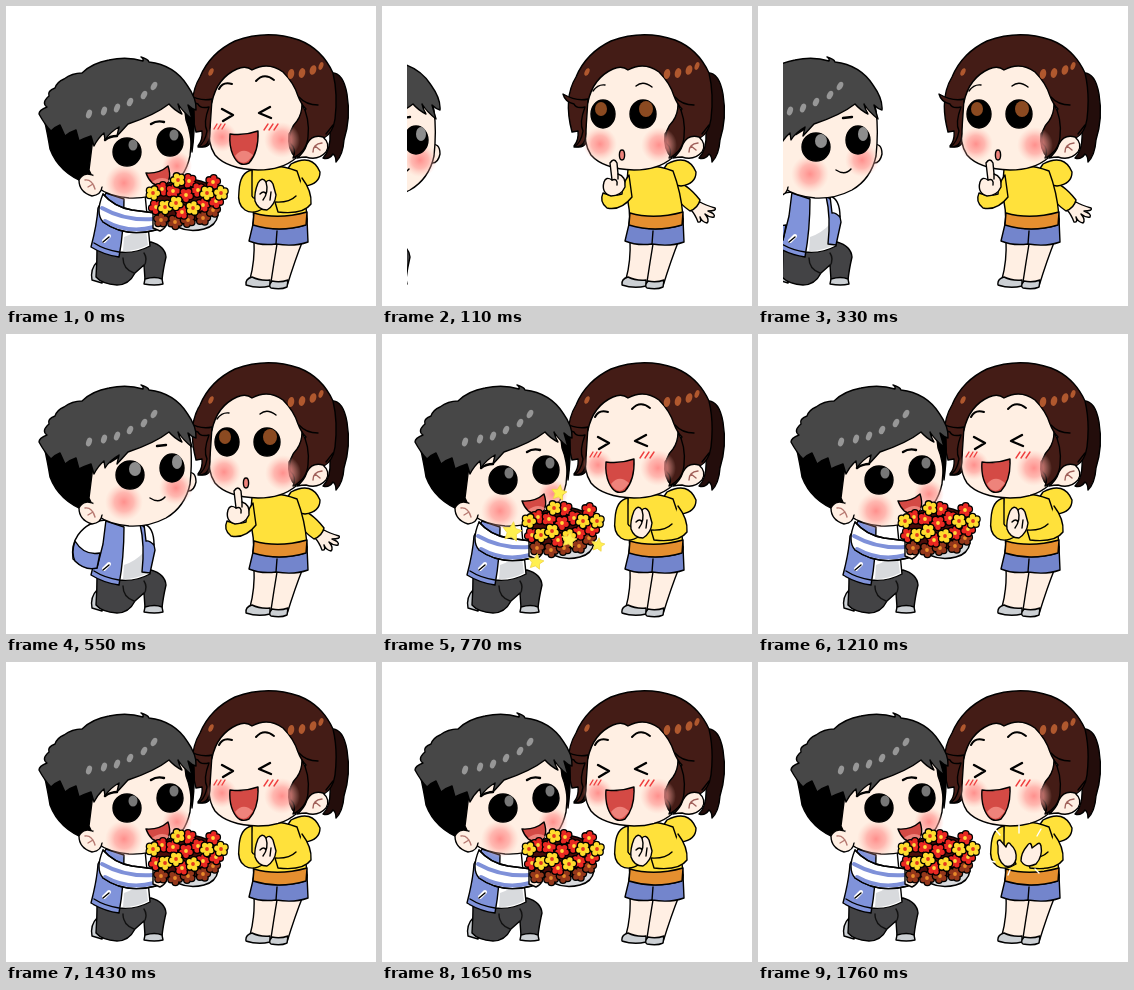
An HTML page for the animation above (1870 ms loop, 370 px wide and 300 px high).

```html
<!DOCTYPE html>
<html lang="en">
<head>
<meta charset="utf-8">
<title>Bouquet</title>
<style>
html, body { margin: 0; width: 100%; height: 100%; overflow: hidden; background: #fff; }
svg { display: block; width: 100%; height: 100%; }
.ink { stroke: #000; stroke-width: 1.4; stroke-linejoin: round; stroke-linecap: round; }
.line { fill: none; }
.bold { fill: none; stroke-width: 2.4; }
.skin { fill: #ffefe3; }
.hair { fill: #474747; }
.brown { fill: #441c16; }
.blue { fill: #8093da; }
.white { fill: #fff; }
.pants { fill: #434345; }
.shoe { fill: #ccd0d4; }
.yellow { fill: #ffe13b; }
.hem { fill: #e58f2f; }
.shorts { fill: #7385cc; }
.red { fill: #d44a45; }
.tongue { fill: #ee837b; }
.shade { fill: #d8dadd; }
.none { stroke: none; }
</style>
</head>
<body>
<svg viewBox="0 0 370 300">
<defs>
  <radialGradient id="blush">
    <stop offset="0" stop-color="#ff8583" stop-opacity=".9"/>
    <stop offset=".5" stop-color="#ff9a95" stop-opacity=".65"/>
    <stop offset="1" stop-color="#ffc0b4" stop-opacity="0"/>
  </radialGradient>
  <clipPath id="edge"><rect x="25" width="345" height="300"/></clipPath>
</defs>
<g class="ink" clip-path="url(#edge)">

<g id="girl">
  <path fill="#230d0b" d="M324 67Q337 65 341 88Q345 112 338 134Q337 149 330 156Q330 150 327 148Q323 154 317 152Q325 144 324 126Z"/>
  <path class="skin" d="M248 234Q249 255 244 273L264 277L266 279L281 280Q289 254 297 234Z"/>
  <path class="line" d="M271 238Q268 256 265 276"/>
  <path class="shoe" d="M246 271Q239 273 240 279Q252 283 264 280L264 274Q254 275 246 271Z"/>
  <path class="shoe" d="M266 275Q262 280 265 282Q275 284 281 281L282 274Q274 277 266 275Z"/>
  <path class="shorts" d="M248 214L243 235Q255 240 270 238Q288 241 302 236L301 213Z"/>
  <path class="line" d="M271 225L270 238"/>

  <g class="think">
    <path class="skin" d="M308 195Q314 198 318 196Q323 199 333 202Q335 205 326 205Q334 208 332 211Q328 212 323 208Q328 214 325 217Q320 216 318 211Q320 217 316 216Q313 208 309 204Z"/>
    <path class="yellow" d="M290 175Q304 176 318 194Q316 202 308 205Q299 199 294 191Z"/>
  </g>
  <path class="yellow" d="M285 158Q306 147 314 166Q314 178 299 180Q288 179 277 170Z"/>
  <path class="yellow" d="M246 163Q269 156 291 165Q299 186 301 210Q302 217 299 219Q272 227 247 218Q249 205 244 188Z"/>
  <path class="hem" d="M248 207Q272 214 301 206L300 219Q273 227 247 219Z"/>

  <path class="brown" d="M190 126Q181 92 194 71Q204 47 229 35Q261 23 293 34Q316 43 327 67Q332 88 329 113Q327 127 318 132L303 143Q296 154 287 150L204 137Q200 143 192 140Q197 134 196 125Z"/>
  <path class="skin" d="M206 96Q211 72 231 63Q240 59 246 64Q262 55 277 66Q288 77 292 90Q295 98 300 103Q290 119 283 128Q281 143 290 152Q276 164 252 164Q221 163 209 149Q201 137 204 119Q202 104 206 96Z"/>
  <path class="brown" d="M206 93Q195 96 181 88Q183 96 192 98Q194 103 203 101Q197 117 201 125Q199 137 192 141Q205 142 204 123Z"/>
  <path class="skin" d="M301 138Q306 128 317 131Q325 138 320 146Q312 155 300 151Q296 151 291 152Q298 147 301 138Z"/>
  <path class="line" stroke="#a0605a" d="M307 146Q307 138 316 137M309 140L314 144"/>
  <path class="brown" d="M296 98Q304 112 302 131Q301 145 287 152Q291 143 284 137Q282 124 291 115Q296 108 296 98Z"/>
  <path class="line" d="M293 91Q300 99 312 99M320 128L327 119"/>
  <g class="none" fill="#b0582e" id="girlShine"></g>

  <g class="think">
    <g class="none" fill="url(#blush)"><circle cx="218" cy="138" r="17"/><circle cx="277" cy="139" r="18"/></g>
    <path class="line" d="M211 85Q216 78 223 79M254 80Q261 74 270 81"/>
    <g fill="#000"><ellipse cx="221" cy="108" rx="12" ry="14"/><ellipse cx="261" cy="108" rx="13" ry="14"/></g>
    <g class="none" fill="#8b4a21"><ellipse cx="219" cy="103" rx="6" ry="7"/><ellipse cx="264" cy="103" rx="7" ry="8"/></g>
    <ellipse class="tongue" cx="240" cy="149" rx="2.6" ry="5"/>
    <path class="yellow" d="M247 169Q240 178 240 188Q230 191 221 187Q217 196 225 202Q239 205 250 191Z"/>
    <path class="skin" d="M230 174L228 157Q232 151 235 157L236 168Q244 170 243 181Q239 190 229 190Q219 187 222 176Q224 170 230 174Z"/>
    <path class="line" d="M230 174Q236 172 235 179M236 168L236 173"/>
  </g>

  <g class="joy">
    <g class="none" fill="url(#blush)"><circle cx="216" cy="131" r="15"/><circle cx="276" cy="134" r="18"/></g>
    <path class="line" stroke-width="2" d="M213 83Q217 75 226 78M250 75Q258 66 268 74"/>
    <path class="bold" d="M216 103L227 109L217 115M264 101L253 107L265 112"/>
    <path class="line" stroke="#ef3f3f" d="M211 118L208 123M215 118L212 123M219 118L216 123M262 118L258 124M267 118L263 124M272 118L268 124"/>
    <path class="red" d="M224 128Q238 130 252 125Q253 146 243 157Q233 162 227 149Q223 140 224 128Z"/>
    <path class="tongue none" d="M229 150Q237 140 247 149Q237 164 229 150Z"/>
    <path class="yellow" d="M246 164Q234 166 233 185Q231 199 239 204Q247 209 258 202L253 190Q248 195 246 190Z"/>
    <path class="yellow" d="M296 172Q306 185 305 198Q297 209 272 206L269 196Q283 197 290 190"/>
    <g id="closed" class="skin">
      <path d="M252 177Q256 170 260 176Q264 172 267 178L270 189Q269 199 261 204Q252 204 249 195Q248 187 252 177Z"/>
      <path class="line" d="M260 176Q263 186 257 194M254 188Q258 184 260 188M265 186L264 194"/>
    </g>
    <g id="open" class="skin">
      <path d="M240 184Q238 178 242 178L248 185Q250 178 253 183Q259 188 258 197Q256 206 247 204Q239 199 240 184Z"/>
      <path d="M278 183Q282 179 283 184Q285 194 278 202Q268 207 263 199Q263 191 269 184Q273 178 274 186Z"/>
      <path class="line" stroke="#fff" d="M237 167L242 173M261 163L261 171M283 167L279 174M232 199L237 200M250 213L252 208M281 211L277 207"/>
    </g>
  </g>
</g>

<g id="boy">
  <path class="shoe" d="M91 256Q84 263 86 274L96 277L101 260Z"/>
  <path class="pants" d="M91 243Q91 256 90 271Q96 278 111 279Q123 279 129 267L138 259L139 274L156 274Q157 264 160 251Q159 240 145 236L112 239Z"/>
  <path class="line" stroke="#111" d="M117 252Q117 263 128 267M138 247Q142 253 138 260"/>
  <path class="shoe" d="M139 273Q149 270 156 273L157 278Q149 280 138 278Z"/>
  <path class="white" d="M114 191L139 188L144 240Q129 248 113 246Z"/>
  <path class="shade none" d="M118 231Q130 227 139 217L142 239Q130 245 117 245Z"/>
  <path class="blue" d="M100 187L118 193Q118 224 113 251Q98 249 85 241Q91 218 92 202Z"/>
  <path class="line" stroke="#fff" stroke-width="4" d="M98 235L103 230"/>
  <path class="line" d="M97 236L103 231M88 237Q99 244 113 246"/>

  <g class="think">
    <path class="white" d="M100 186Q82 187 72 201Q65 211 67 225Q78 236 91 234L97 210Z"/>
    <path class="blue" d="M69 207Q65 219 69 227Q79 237 91 234L94 219Q78 222 69 207Z"/>
    <path class="blue" d="M134 190Q146 197 149 216L144 239L136 238Q139 211 134 190Z"/>
    <path class="white" d="M138 190Q148 193 148 211Q143 206 140 207Z"/>
    <path class="skin" d="M180 139Q190 136 190 148Q188 158 181 157Z"/>
  </g>

  <path fill="#000" d="M38 112Q42 130 44 143Q53 167 80 177L92 169L96 120Z"/>
  <path class="skin" d="M87 132L112 105L180 86Q188 112 184 150Q179 173 160 184Q143 193 123 192Q102 190 91 181L83 164Z"/>
  <path class="skin" d="M91 171Q78 164 73 174Q73 186 86 190Q95 189 96 181"/>
  <path class="line" stroke="#b67870" d="M79 174Q86 173 89 183M82 181L87 178"/>
  <path class="skin none" d="M91 165L99 179L94 181L87 170Z"/>

  <g class="think">
    <g class="none" fill="url(#blush)"><circle cx="118" cy="168" r="19"/><circle cx="170" cy="154" r="17"/></g>
    <path class="bold" d="M104 128L112 123M151 112L160 111"/>
    <g fill="#000"><circle cx="124" cy="141" r="14"/><ellipse cx="166" cy="134" rx="12" ry="14"/></g>
    <g class="none" fill="#8d8d8d"><ellipse cx="129" cy="135" rx="6" ry="7"/><ellipse cx="171" cy="128" rx="5" ry="7"/></g>
    <path class="line" d="M144 164Q153 170 159 163"/>
  </g>
  <g class="joy">
    <path fill="#000" d="M178 98L188 104Q189 125 186 146Q185 126 180 114Z"/>
    <g class="none" fill="url(#blush)"><circle cx="118" cy="177" r="19"/><circle cx="171" cy="160" r="15"/></g>
    <path class="bold" stroke-width="3" d="M99 134Q104 130 111 130M145 118Q151 114 158 116"/>
    <g fill="#000"><circle cx="121" cy="146" r="14"/><ellipse cx="164" cy="136" rx="13" ry="14"/></g>
    <g class="none" fill="#777"><ellipse cx="127" cy="139" rx="4.5" ry="5.5"/><ellipse cx="168" cy="129" rx="4.5" ry="5.5"/></g>
    <path class="red" d="M140 167Q153 168 162 160Q167 175 157 180Q145 181 140 167Z"/>
    <path class="tongue none" d="M146 176Q155 169 163 174Q158 183 146 176Z"/>
  </g>

  <path class="hair" d="M33 108Q33 104 41 101Q35 97 43 90Q41 85 49 82Q51 76 58 73Q66 67 76 67Q86 57 103 54Q121 50 137 55Q138 53 135 51Q142 53 143 56Q168 59 181 79Q191 93 190 104Q186 103 182 99Q184 106 186 113Q177 106 172 98Q173 103 176 108Q168 104 163 98Q149 109 122 118L111 130L113 121Q104 126 99 134L98 127Q92 132 88 140L85 130Q79 132 73 135L70 124Q64 126 59 130L54 119Q49 121 45 125Q39 119 33 108Z"/>
  <g class="none" fill="#979797" id="boyShine"></g>

  <g class="joy">
    <path class="shade" d="M158 211Q175 229 198 223Q210 220 212 209Z"/>
    <path class="white" d="M97 188Q108 201 126 204L149 207L150 224Q119 232 97 216Q89 207 97 188Z"/>
    <path class="line" stroke="#7f91d9" stroke-width="4" d="M96 202Q119 215 147 213M99 215Q122 228 148 221"/>
    <path class="line" d="M97 188Q108 201 126 204L149 207L150 224Q119 232 97 216"/>
    <path class="skin" d="M147 207Q156 204 160 211Q163 221 154 225L147 222Z"/>
    <g id="bouquet"></g>
  </g>
</g>
<g id="stars" fill="#fff04f" stroke="#f0d548" stroke-width=".8"></g>
</g>
</svg>
<script>
const STEP = 110, STEPS = 17;
const ARRIVED = 5;      // boy is in place
const STARS_END = 10;
const BOY_SPEED = 33, HOP = 10;
const $ = id => document.getElementById(id);
const show = (el, on) => el.style.display = on ? "" : "none";

const shine = (spots, rx, ry) => spots.map(([x, y, turn]) =>
  `<ellipse rx="${rx}" ry="${ry}" transform="translate(${x} ${y}) rotate(${turn})"/>`).join("");
$("boyShine").innerHTML =
  shine([[83, 108, 20], [98, 105, 20], [111, 102, 22], [124, 96, 24], [138, 89, 26], [148, 80, 28]], 2.8, 4.5);
$("girlShine").innerHTML =
  shine([[285, 68, 12], [296, 67, 14], [307, 64, 18]], 3.2, 5) + shine([[315, 60, 20], [205, 66, 25]], 2.2, 4);

const COLORS = { r: ["#e92822", "#ffd83b"], y: ["#ffdc2e", "#e3381f"], b: ["#94371b", "#e88a2a"] };
function flower([x, y, kind]) {
  const [petal, core] = COLORS[kind];
  let petals = "";
  for (let i = 0; i < 5; i++) {
    const a = (i * 72 - 90 + x * 7) * Math.PI / 180;
    petals += `<circle cx="${(x + 4.2 * Math.cos(a)).toFixed(1)}" cy="${(y + 4.2 * Math.sin(a)).toFixed(1)}" r="2.7"/>`;
  }
  return `<g stroke-width="2.6">${petals}</g><g class="none" fill="${petal}">${petals}
    <circle cx="${x}" cy="${y}" r="3"/><circle cx="${x}" cy="${y}" r="1.9" fill="${core}"/></g>`;
}
const flowers = [
  [155, 214, "b"], [169, 216, "b"], [182, 214, "b"], [197, 212, "b"], [207, 204, "b"],
  [183, 175, "r"], [156, 183, "r"], [207, 176, "r"], [192, 184, "r"], [167, 185, "r"],
  [150, 201, "r"], [180, 189, "r"], [197, 199, "r"], [210, 195, "r"], [176, 206, "r"],
  [172, 174, "y"], [147, 187, "y"], [201, 187, "y"], [215, 187, "y"],
  [159, 201, "y"], [170, 197, "y"], [187, 202, "y"]
];
$("bouquet").innerHTML =
  `<path fill="#4a0d0a" d="M148 186Q164 171 190 174Q212 178 213 195Q208 212 183 216Q154 215 150 204Z"/>` +
  flowers.map(flower).join("");

const starPath = r => "M" + Array.from({ length: 10 }, (_, i) => {
  const a = i * Math.PI / 5 - 1.4, d = i % 2 ? r * .5 : r;
  return (d * Math.cos(a)).toFixed(1) + " " + (d * Math.sin(a)).toFixed(1);
}).join("L") + "Z";
// start, velocity per step, size
const sparks = [
  [171, 179, 3, -10, 8], [162, 190, -16, 4, 10], [170, 209, -8, 9.5, 8],
  [172, 189, 7.5, 8.5, 8], [194, 199, 11, 6, 7]
];
$("stars").innerHTML = sparks.map(s => `<path d="${starPath(s[4])}"/>`).join("");
const stars = [...$("stars").children];
const move = (el, x, y) => el.setAttribute("transform", `translate(${x} ${y})`);

function draw(ms) {
  const k = Math.floor(ms / STEP) % STEPS;
  const since = k - ARRIVED;
  const think = k > 0 && since <= 0;
  document.querySelectorAll(".think").forEach(el => show(el, think));
  document.querySelectorAll(".joy").forEach(el => show(el, !think));

  move($("boy"), think ? since * BOY_SPEED : 0, 0);
  move($("girl"), 0, since === 1 ? -HOP : 0);

  const apart = k > 0 && k % 2 === 0;
  show($("open"), apart);
  show($("closed"), !apart);

  show($("stars"), since > 0 && k <= STARS_END);
  stars.forEach((star, i) => {
    const [x, y, vx, vy] = sparks[i];
    move(star, x + vx * since, y + vy * since);
  });
}

const start = performance.now();
function tick() {
  draw(performance.now() - start);
  requestAnimationFrame(tick);
}
tick();
</script>
</body>
</html>
```
